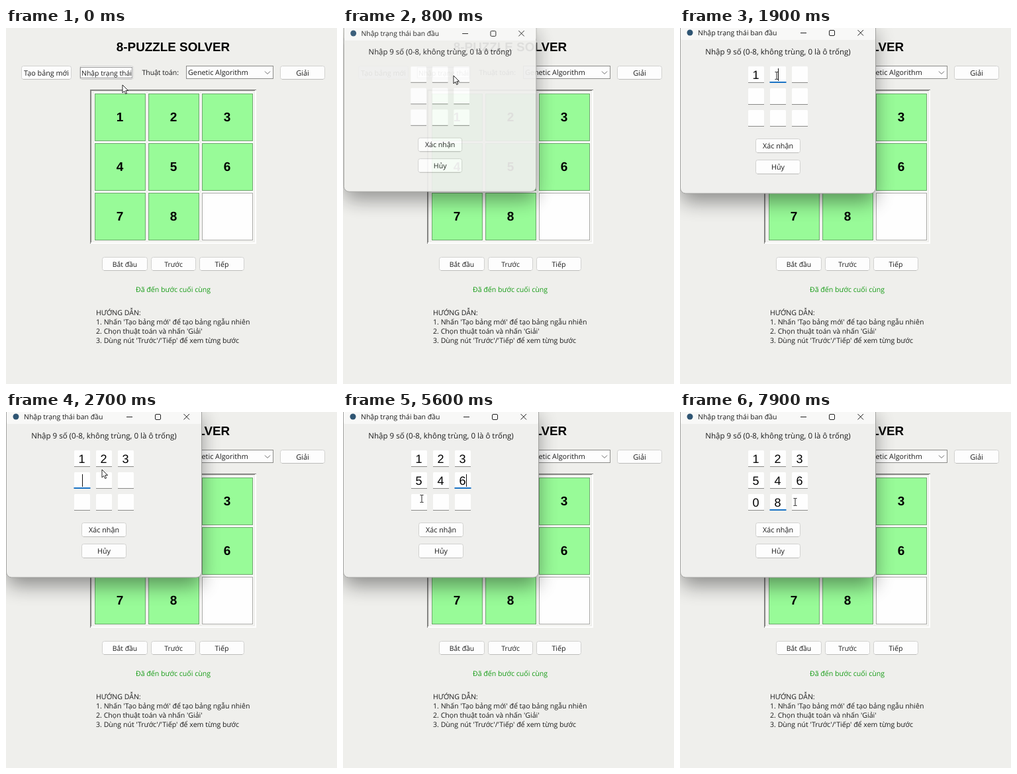
These frames come from a looping animation (500 by 538 pixels, 8 s). An HTML page:

```html
<!DOCTYPE html>
<html lang="vi">
<head>
<meta charset="utf-8">
<title>8-Puzzle</title>
<style>
  html, body { margin: 0; width: 100%; height: 100%; overflow: hidden; background: #efefec; }
  svg { display: block; width: 500px; height: 538px; }
  text { font: 10.6px "Open Sans", "Noto Sans", sans-serif; fill: #1b1b1b; text-rendering: geometricPrecision; white-space: pre; }
  .bold, .digit { font-family: "Liberation Sans", Arial, sans-serif; fill: #000; }
  .bold { font-weight: bold; }
  .mid { text-anchor: middle; }
</style>
</head>
<body>
<svg id="stage" viewBox="0 0 500 538" xmlns="http://www.w3.org/2000/svg">
  <defs>
    <filter id="blur" x="-40%" y="-40%" width="180%" height="180%"><feGaussianBlur stdDeviation="15"/></filter>
  </defs>
  <rect width="500" height="538" fill="#efefec"/>
  <g id="main"></g>
  <g id="dialog"></g>
  <g id="mouse">
    <path id="arrow" d="M0 0V12L2.8 9.4L4.7 13.6L6.6 12.8L4.8 8.6H8.6Z" fill="#fff" stroke="#111" stroke-width=".9"/>
    <path id="beam" d="M-2.5-5.5H-.6L0-5L.6-5.5H2.5M0-5V5M-2.5 5.5H-.6L0 5L.6 5.5H2.5" fill="none" stroke="#222" stroke-width="1"/>
  </g>
</svg>
<script>
const LOOP = 8000, STEP = 100;
const byId = id => document.getElementById(id);
const main = byId('main'), dialog = byId('dialog');

function add(parent, tag, attrs, content) {
  const el = document.createElementNS('http://www.w3.org/2000/svg', tag);
  for (const key in attrs) el.setAttribute(key, attrs[key]);
  if (content !== undefined) el.textContent = content;
  parent.appendChild(el);
  return el;
}
const rect = (parent, x, y, width, height, attrs) => add(parent, 'rect', { x, y, width, height, ...attrs });
const path = (parent, d, stroke, width = 1) => add(parent, 'path', { d, fill: 'none', stroke, 'stroke-width': width });
const label = (parent, x, y, str, size = 10.6, attrs = {}) =>
  add(parent, 'text', { x, y, style: `font-size:${size}px`, ...attrs }, str);
const show = (el, on) => el.setAttribute('visibility', on ? 'inherit' : 'hidden');

function button(parent, x, y, w, h, str, size) {
  rect(parent, x + .5, y + .5, w - 1, h - 1, { rx: 3, fill: '#fdfdfd', stroke: '#d2d2d0' });
  path(parent, `M${x + 3} ${y + h - .5}h${w - 6}`, '#bcbcba');
  label(parent, x + w / 2, y + h / 2 + 4, str, size, { class: 'mid' });
}

function buildMain() {
  label(main, 252.5, 35, '8-PUZZLE SOLVER', 18.85, { class: 'bold mid' });
  button(main, 23, 57, 76, 21, 'Tạo bảng mới', 10.8);
  button(main, 111, 57, 82, 21, 'Nhập trạng thái', 10.4);
  rect(main, 112.5, 59.5, 78, 16, { fill: 'none', stroke: '#333', 'stroke-dasharray': '1 1' });
  label(main, 205.5, 71, 'Thuật toán:', 10.4);
  rect(main, 272.5, 57.5, 131, 19, { fill: '#fdfdfd', stroke: '#8c8c8a' });
  label(main, 275, 71, 'Genetic Algorithm', 10.8);
  path(main, 'M391 65.5l4 4l4-4', '#666');
  button(main, 414, 57, 68, 21, 'Giải', 11);

  path(main, 'M128 326V94H378', '#858583', 2);
  path(main, 'M128 325H377V94', '#fff', 2);
  for (let i = 0; i < 9; i++) {
    const cx = 172 + i % 3 * 81, cy = 134 + Math.floor(i / 3) * 75;
    const blank = i === 8;
    rect(main, cx - 38.5, cy - 36.5, 78, 74, { fill: '#fff', stroke: '#fcfcfa' });
    rect(main, cx - 37.5, cy - 34.5, 76, 71, { fill: blank ? '#fefefe' : '#98fb98', stroke: blank ? '#a8a8a6' : '#6da56d' });
    if (!blank) label(main, cx, cy + 6.7, i + 1, 19, { class: 'bold mid' });
  }

  button(main, 145, 346, 69, 21, 'Bắt đầu', 10.4);
  button(main, 219, 346, 68, 21, 'Trước', 10.4);
  button(main, 292, 346, 68, 21, 'Tiếp');
  label(main, 252.5, 399, 'Đã đến bước cuối cùng', 10.6, { class: 'mid', fill: '#169c16' }).style.fill = '#169c16';
  ['HƯỚNG DẪN:',
    "1. Nhấn 'Tạo bảng mới' để tạo bảng ngẫu nhiên",
    "2. Chọn thuật toán và nhấn 'Giải'",
    "3. Dùng nút 'Trước'/'Tiếp' để xem từng bước"
  ].forEach((line, i) => label(main, 136, 434 + i * 14, line));
}

const cellAt = i => ({ x: 103 + i % 3 * 33, y: 58 + Math.floor(i / 3) * 33 });

function buildDialog() {
  rect(dialog, 2, 6, 292, 256, { rx: 8, fill: '#000', opacity: .42, filter: 'url(#blur)' });
  rect(dialog, .5, -20, 295, 270, { rx: 8, fill: '#efefed', stroke: '#a3a3a1' });
  rect(dialog, 1, -19, 294, 40, { rx: 7, fill: '#f8f8f7' });
  rect(dialog, 1, 18, 294, 6, { fill: '#efefed' });
  add(dialog, 'circle', { cx: 15, cy: 7, r: 4.5, fill: '#2f5573' });
  label(dialog, 27, 11, 'Nhập trạng thái ban đầu', 10.5);
  path(dialog, 'M182 7.5h9M268.5 3l8.5 8.5M277 3l-8.5 8.5', '#222');
  rect(dialog, 225.5, 3.5, 8, 8, { rx: 1.5, fill: 'none', stroke: '#222' });
  label(dialog, 148, 39.5, 'Nhập 9 số (0-8, không trùng, 0 là ô trống)', 11.55, { class: 'mid' });
  button(dialog, 114, 167, 68, 22, 'Xác nhận', 10.8);
  button(dialog, 114, 199, 68, 22, 'Hủy', 10.8);
  return Array.from({ length: 9 }, (_, i) => {
    const { x, y } = cellAt(i);
    rect(dialog, x, y, 24, 24, { rx: 1.5, fill: '#fefefe' });
    path(dialog, `M${x} ${y + 24.5}h24`, '#8a8a88');
    return {
      ring: rect(dialog, x - .5, y + 23, 25, 2, { fill: '#1a73c4' }),
      digit: label(dialog, x + 11.5, y + 18.5, '', 18, { class: 'digit mid' })
    };
  });
}

buildMain();
const cells = buildDialog();
const caret = rect(dialog, 0, 0, 1, 19, { fill: '#111' });

// time of click, time of key, key
const entries = [
  [1500, 1700, 1], [1900, 2100, 2], [2250, 2400, 3],
  [2600, 3100, 5], [3800, 4300, 4], [4600, 5100, 6],
  [5700, 6000, 0], [6400, 7200, 8]
];
// time, x, y
const trail = [
  [0, 176, 86], [500, 167, 72], [800, 167, 72], [1200, 99, 62], [1500, 115, 71],
  [1700, 117, 72], [1900, 146, 72], [2100, 147, 72], [2250, 178, 72], [2400, 178, 73],
  [2600, 118, 101], [2700, 145, 87], [3300, 142, 106], [3800, 140, 107], [4300, 139, 107],
  [4600, 178, 106], [5200, 178, 106], [5600, 119, 131], [6050, 119, 132], [6350, 147, 136],
  [7200, 147, 136], [7900, 174, 136]
];

function mouseAt(t) {
  const i = trail.findIndex(p => p[0] > t);
  if (i < 0) return trail[trail.length - 1].slice(1);
  const [t0, x0, y0] = trail[i - 1], [t1, x1, y1] = trail[i];
  const u = (t - t0) / (t1 - t0), e = u * u * (3 - 2 * u);
  return [x0 + (x1 - x0) * e, y0 + (y1 - y0) * e];
}

function drawDialog(t) {
  const q = 1 - Math.min(1, Math.max(0, (t - 550) / 350)), rest = q * q;
  show(dialog, t >= 600);
  dialog.setAttribute('opacity', 1 - .85 * rest);
  dialog.setAttribute('transform', `translate(${11 * rest} ${13.5 * rest}) scale(${1 - .185 * rest})`);

  let focus = -1, lastEvent = 0;
  entries.forEach(([click, key], i) => {
    if (t >= click) { focus = i; lastEvent = t >= key ? key : click; }
  });
  cells.forEach(({ ring, digit }, i) => {
    const entry = entries[i];
    digit.textContent = entry && t >= entry[1] ? entry[2] : '';
    show(ring, i === focus);
  });
  show(caret, focus >= 0 && (t - lastEvent) % 900 < 600);
  if (focus >= 0) {
    const { x, y } = cellAt(focus);
    caret.setAttribute('x', x + (t >= entries[focus][1] ? 17 : 12));
    caret.setAttribute('y', y + 3);
  }
}

function drawMouse(t) {
  const [x, y] = mouseAt(t);
  const inCell = t >= 900 && cells.some((_, i) => {
    const c = cellAt(i);
    return x >= c.x && x <= c.x + 24 && y >= c.y && y <= c.y + 24;
  });
  byId('mouse').setAttribute('transform', `translate(${x} ${y})`);
  show(byId('arrow'), !inCell);
  show(byId('beam'), inCell);
}

function render(now) {
  const t = Math.floor(now % LOOP / STEP) * STEP;
  drawDialog(t);
  drawMouse(t);
}

const start = performance.now();
function tick() {
  render(performance.now() - start);
  requestAnimationFrame(tick);
}
tick();
</script>
</body>
</html>
```
